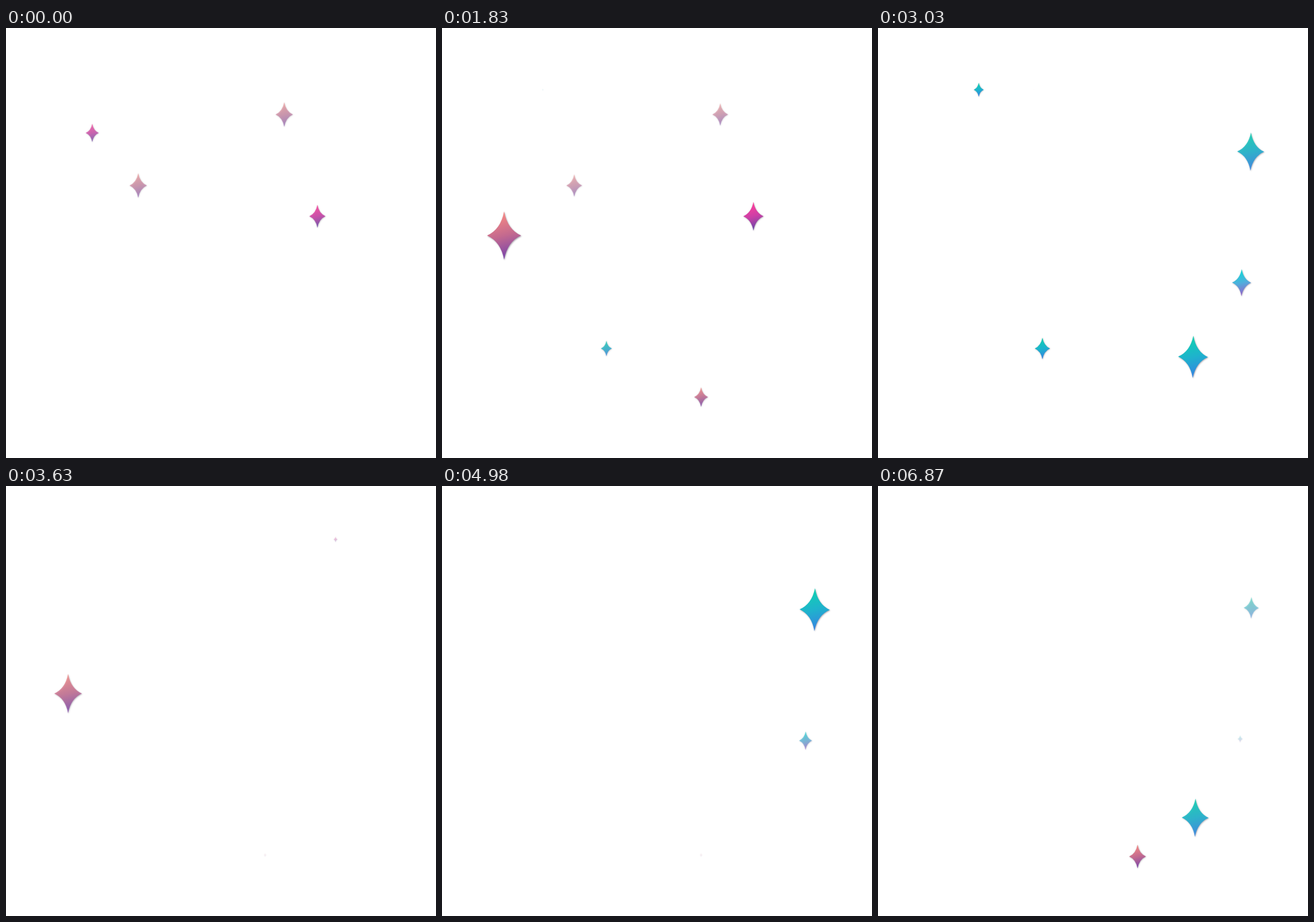
These frames come from a looping animation (748 px wide and 748 px high, 6.9 s). An HTML page with a canvas:

```html
<!DOCTYPE html>
<html lang="en">
<head>
<meta charset="utf-8">
<title>Twinkling stars</title>
<style>
  html, body { margin: 0; width: 100%; height: 100%; overflow: hidden; background: #fff; }
  canvas { display: block; width: 748px; height: 748px; }
</style>
</head>
<body>
<canvas id="stage" width="748" height="748"></canvas>
<script>
const ctx = document.getElementById('stage').getContext('2d');
const LOOP = 6900, STEP = 30, RISE = 130, FALL = 250;

const CORAL = ['#f38583', '#c4688e', '#7f45a8'];
const PINK = ['#fb409c', '#cc3fa6', '#7046a8'];
const TEAL = ['#10ceb4', '#1db3cd', '#3287e0'];
const AQUA = ['#14d6d8', '#4fafdc', '#9068cc'];

// Each pulse is a peak time, or [peak time, dx, dy] when it drifts.
const star = (x, y, w, colors, tilt, ...pulses) =>
  ({ x, y, w, colors, tilt, pulses: pulses.map(p => [].concat(p, 0, 0)) });

const stars = [
  star(150, 182.5, 34, PINK, 0, 75, 2445, 3200, 3900, 4520, 5900, 6450),
  star(230, 274, 57, CORAL, 0, 89, 1650, 2459, 3220, 3800, [4448, -2, 1], [5805, -3, 0]),
  star(484, 150.5, 57, CORAL, 0, 89, [1093, -2, 4], 1650, 2459, 3220, 3850, 4460, [5805, -3, 0.5]),
  star(541.7, 327.5, 36, PINK, 0, 61, 1850, 2431, 3300, [4249, 2.8, 2.5], 4650, 6100),
  star(573.3, 93, 23, PINK, 0, [1088, -2.5, -2], 2409, 3420, 4700),
  star(271, 107, 34, PINK, 0, 230, 2445, 3158, 3790, 4500, 5960, 6480),
  star(108, 361, 66, CORAL, 0, 180, 890, 1750, 2453, 3500, 4060, 4560, 5200, 5980),
  star(172, 480.5, 67, AQUA, 0.015, 260, 2409, 3250, 3980, 4480, 6020),
  star(450.7, 642, 33, CORAL, 0, 1330, 1700, 2466, 3400, 4750, [6783, 0.8, 2.5]),
  star(175.3, 107.5, 18, TEAL, 0, 480, 1600, 2974, 4000, 5230, 6600),
  star(648.3, 215, 58, TEAL, 0.015, 700, 2921, 5020, [6685, 1, -3]),
  star(632.5, 443, 36, AQUA, 0.01, 690, 2959, 5060, [6654, -2.5, -3]),
  star(286, 557.5, 27, TEAL, 0, 520, 1900, 2995, [4259, 2, 0], 5150, 6620),
  star(548, 572, 57, TEAL, 0.015, [895, 3, 3], 2955, [5180, 3, 3], [6764, 3.8, 5])
];

const pulseSize = u => Math.max(0, 1 - (u / (u < 0 ? RISE : FALL)) ** 2);

function starPath(a, b) {
  const cx = a * 0.2, cy = b * 0.25;
  ctx.beginPath();
  ctx.moveTo(0, -b);
  ctx.quadraticCurveTo(cx, -cy, a, 0);
  ctx.quadraticCurveTo(cx, cy, 0, b);
  ctx.quadraticCurveTo(-cx, cy, -a, 0);
  ctx.quadraticCurveTo(-cx, -cy, 0, -b);
  ctx.closePath();
}

function drawStar(s, dx, dy, size) {
  const a = s.w * size / 2, b = a * 1.42;
  const fill = ctx.createLinearGradient(-b * 0.22, -b * 0.8, b * 0.22, b * 0.8);
  s.colors.forEach((c, i) => fill.addColorStop(i / 2, c));
  ctx.save();
  ctx.translate(s.x + dx, s.y + dy);
  ctx.rotate(s.tilt);
  ctx.globalAlpha = Math.min(1, Math.max(0.08, size * 1.2 - 0.1));
  ctx.shadowColor = 'rgba(50, 40, 60, 0.45)';
  ctx.shadowBlur = 2.5;
  ctx.shadowOffsetX = a * 0.03;
  ctx.shadowOffsetY = a * 0.04;
  ctx.fillStyle = fill;
  starPath(a, b);
  ctx.fill();
  ctx.restore();
}

function draw(t) {
  ctx.fillStyle = '#fff';
  ctx.fillRect(0, 0, 748, 748);
  for (const s of stars) {
    let best = 0, pulse;
    for (const p of s.pulses) {
      const size = pulseSize(t - p[0]);
      if (size > best) { best = size; pulse = p; }
    }
    if (pulse) drawStar(s, pulse[1], pulse[2], best);
  }
}

const start = performance.now();
function tick() {
  const t = (performance.now() - start) % LOOP;
  draw(Math.floor(t / STEP) * STEP);
  requestAnimationFrame(tick);
}
tick();
</script>
</body>
</html>
```
